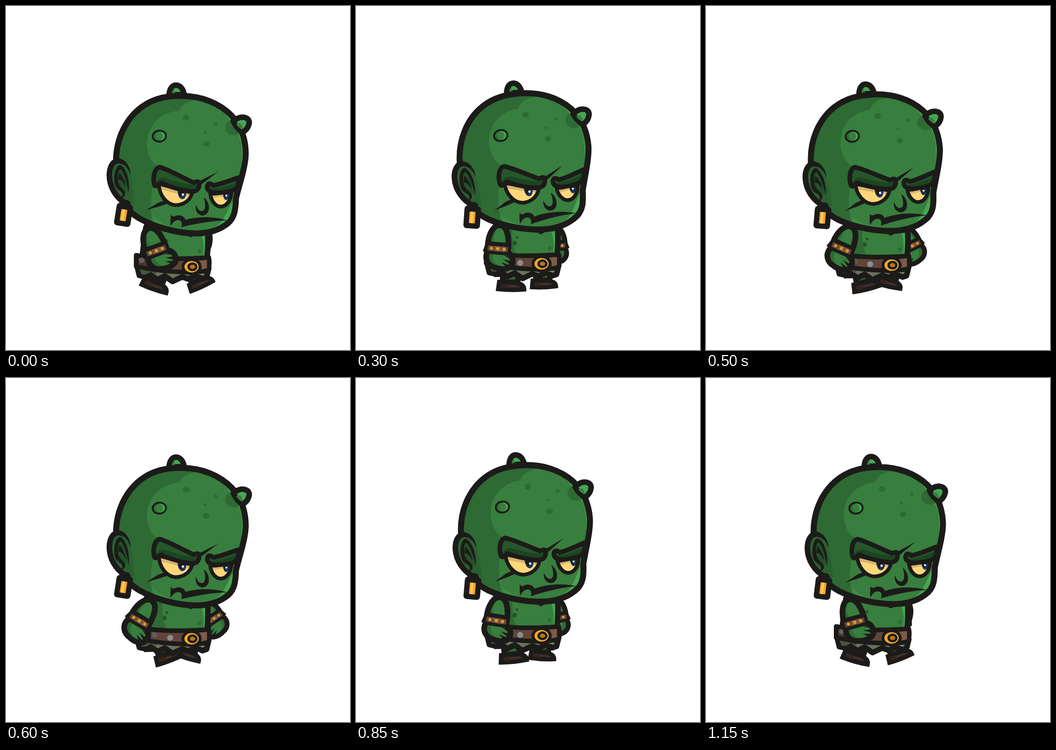
These frames come from a looping animation (748x748 px, 1.2 s). An HTML page:

```html
<!DOCTYPE html>
<html lang="en">
<head>
<meta charset="utf-8">
<title>Goblin walk</title>
<style>
  html, body { margin: 0; width: 100%; height: 100%; overflow: hidden; background: #fff; }
  svg { display: block; width: 100vw; height: 100vh; }
  .ink { fill: #1c1b19; }
  .line { stroke: #1c1b19; stroke-width: 12; stroke-linejoin: round; stroke-linecap: round; }
  .mid { stroke-width: 10; }
  .thin { stroke-width: 8; }
  .open { fill: none; }
  .sharp { stroke-linejoin: miter; }
  .skin { fill: #387e3e; }
  .shade { fill: #2e6a34; }
  .light { fill: #45a651; }
  .lid { fill: #25572b; }
  .deep { fill: #1b4520; }
  .eye { fill: #ffd77a; }
  .tan { fill: #d8b570; }
  .iris { fill: #18335f; }
  .gold { fill: #f6a626; }
  .belt { fill: #614539; }
  .shoe { fill: #41302a; }
</style>
</head>
<body>
<svg viewBox="0 0 748 748">
  <defs>
    <path id="skull" d="M239 338C239 287 262 241 300 216C325 200 350 195.500 380 195.500C425 195 465 212 490 238C512 262 521 290 521 322C520 352 507 388 500 418C499 446 496 459 484 471C465 487 440 494.500 412 494.500C370 494 325 481 290 462C270 450 255 435 245 410Z"/>
    <path id="eyeL" d="M332 387C350 390 375 400 405 406C401 421 388 433 368 433C348 431 333 411 332 387Z"/>
    <path id="eyeR" d="M444 408C460 409 475 405 490 399C491 416 483 436 466 436C453 435 445 420 444 408Z"/>
    <path id="torsoShape" d="M306 478H438C440 510 439 535 436 556H296C298 530 302 500 306 478Z"/>
    <path id="upper" d="M290 532C288 508 297 484 312 483C327 483 334 503 335 532Z"/>
    <path id="fore" d="M291 541C283 560 295 574 312 576C326 580 343 576 346 566C349 555 343 545 335 541Z"/>
    <clipPath id="inSkull"><use href="#skull"/></clipPath>
    <clipPath id="inL"><use href="#eyeL"/></clipPath>
    <clipPath id="inR"><use href="#eyeR"/></clipPath>
    <clipPath id="inTorso"><use href="#torsoShape"/></clipPath>
    <clipPath id="inArm"><use href="#upper"/><use href="#fore"/></clipPath>

    <g id="arm">
      <use href="#upper" class="skin line"/>
      <use href="#fore" class="skin line"/>
      <g clip-path="url(#inArm)">
        <path class="shade" d="M276 480H312C302 492 300 508 303 530V548C301 562 312 572 334 579H276Z"/>
      </g>
      <use href="#upper" class="line open"/>
      <use href="#fore" class="line open"/>
      <path class="ink" d="M286 520L280 542L291 547H341L340 520Z"/>
      <path class="belt" d="M290 529H334V540H290Z"/>
      <path fill="#7b583e" d="M304 529H327V540H304Z"/>
      <g class="gold" fill-opacity=".85">
        <circle cx="298" cy="534.500" r="3.500"/><circle cx="312" cy="534.500" r="3.500"/><circle cx="326" cy="534.500" r="3.500"/>
      </g>
      <path class="ink" d="M346 550L326 547L344 556ZM346 559L325 556L342 566ZM342 568L322 563L336 574Z"/>
    </g>

    <g id="leg">
      <path class="shade line" d="M320 572L319 602H352L353 572Z"/>
      <path class="shoe line mid sharp" d="M312 602L310 617C330 619 350 618.500 366 617C366 609 360 606 350 603Z"/>
      <path fill="#34261f" d="M316 606L315 613C321 615 327 615 332 615L331 606Z"/>
    </g>
  </defs>

  <g id="farArm"><use href="#arm" transform="translate(432 492) scale(-.85 .85) translate(-312.700 -491)"/></g>
  <g id="legB"><use href="#leg" transform="translate(407 565) scale(.93) translate(-338 -567)"/></g>
  <g id="legA"><use href="#leg"/></g>

  <g id="body">
    <use href="#torsoShape" class="skin line"/>
    <g clip-path="url(#inTorso)">
      <path class="shade" d="M290 478H343C337 500 340 528 352 556H290Z"/>
      <path class="light" d="M425 498C431 515 431 535 428 550H440V498Z"/>
      <ellipse class="shade" cx="421" cy="533" rx="4" ry="4.500"/>
      <g fill="#235429"><ellipse cx="345" cy="522" rx="4.500" ry="5"/><circle cx="350" cy="510" r="3"/></g>
    </g>
    <use href="#torsoShape" class="line open"/>
    <path class="line open" style="stroke-width:16" d="M306 482L298 545"/>
    <path class="ink" d="M378 490C388 504 394 496 399 502C406 504 408 498 424 490Z"/>

    <path class="line" fill="#69735a" d="M285 566L290 586L304 589L315 584L329 595L345 587L362 599L383 589L397 594L414 586L427 593L436 590L441 570Z"/>
    <path fill="#4b5441" d="M290 571L295 584L304 584L315 578L324 585L330 576Z"/>
    <path fill="#7d866a" d="M408 580L428 586L435 576Z"/>
    <path class="ink" d="M300 590L315 579L328 591L344 584L361 595L382 585L397 590L414 582L426 589L436 583V592L300 596Z"/>
    <path class="belt line mid" d="M283 542C320 549 370 552 441 547C443 556 442 566 440 575C400 583 330 577 283 566Z"/>
    <path fill="#49352d" d="M288 548L311 552V566L288 562Z"/>
    <path fill="#7d5a4b" d="M421 554L437 552V570L424 573Z"/>
    <circle cx="295" cy="553" r="6" fill="#626262"/>
    <circle cx="323" cy="559" r="6" fill="#5e5e5e"/>
    <circle cx="357" cy="565" r="6.500" fill="#8c8c8c"/>
    <ellipse class="ink" cx="403.500" cy="567" rx="22" ry="18.500"/>
    <ellipse class="gold" cx="403.500" cy="567" rx="15.500" ry="12.500"/>
    <path fill="#ffc35a" d="M413 558C419 564 419 570 413 576Z"/>
    <ellipse class="ink" cx="405.500" cy="567" rx="11" ry="9.500"/>
    <ellipse cx="405.500" cy="567" rx="6" ry="4.500" fill="#b5761c"/>
  </g>

  <g id="nearArm"><use href="#arm"/></g>

  <g id="head">
    <path class="light line" d="M354 193C355 180 361 172 369 172C378 172 385 180 387 193Z"/>
    <path class="skin" d="M360 190C361 184 363 181 366 179C365 184 365 187 368 190Z"/>
    <use href="#skull" class="skin"/>
    <g clip-path="url(#inSkull)">
      <path class="shade" d="M414 205C394 207 381 215 376 228C335 230 305 262 306 302C308 330 320 343 332 350L319 395C313 430 313 455 325 500H200V180H414Z"/>
      <path class="light" d="M446 206C478 232 504 266 511 296C515 325 511 348 506 378H530V200Z"/>
      <path class="light" d="M504 410C488 428 484 444 476 456C468 477 445 487 420 492L490 504L515 420Z"/>
      <path class="light" fill-opacity=".35" d="M318 455C335 474 365 486 400 491L330 498Z"/>
      <g class="shade">
        <ellipse cx="495" cy="264" rx="19" ry="17"/>
        <ellipse cx="391" cy="243" rx="7" ry="6"/>
        <ellipse cx="455.500" cy="257" rx="4" ry="3.500"/>
        <circle cx="432.500" cy="275" r="2.800"/>
        <ellipse cx="435" cy="299.500" rx="7" ry="6"/>
      </g>
    </g>
    <use href="#skull" class="line open" style="stroke-width:13"/>

    <path fill="#2a6030" d="M244 337C262 336 273 365 276 400L279 431L262 432C240 420 224 390 224 365C226 348 233 338 244 337Z"/>
    <path class="line open" d="M261 430C238 417 224 392 224.500 367C225 348 233 337 244 336.500"/>
    <path class="ink" d="M240 331C259 331 270 348 271 368C264 350 257 343 243 342Z"/>
    <path fill="#225129" d="M240 380C240 362 244 355 250 356C259 366 264 384 263 405C254 404 244 396 240 380Z"/>
    <path class="ink" d="M236 386C233 362 240 346 249 346C263 355 270 383 266 408C263 386 258 364 249 355C242 358 243 372 244 384C248 395 257 399 259 406C260 412 256 417 250 418C254 412 254 407 249 403C243 399 238 395 236 386Z"/>
    <path class="ink" d="M246 362C254 372 259 381 260 394C255 384 250 376 244 378Z"/>

    <circle class="ink" cx="262" cy="431" r="9"/>
    <path class="ink" d="M262 428L277 438L266 443Z"/>
    <g transform="rotate(9 255.500 454.500)">
      <rect class="ink" x="237.500" y="430" width="36" height="49" rx="7"/>
      <rect class="gold" x="249" y="442.500" width="13" height="25"/>
      <rect x="252" y="442.500" width="5" height="25" fill="#ffc866"/>
    </g>

    <path class="light line" d="M494 250C498 260 505 269 514 274C522 270 527 262 528.500 254C529 245 521 241 512 241.500C505 242 500 245 494 250Z"/>
    <path class="skin" d="M500 257C503 255 506 254 509 255C513 259 515 264 513 269C508 266 504 262 500 257Z"/>

    <g transform="rotate(-6 333 283)">
      <ellipse class="light" cx="333" cy="283" rx="15" ry="12"/>
      <ellipse class="shade" cx="328" cy="283" rx="10" ry="12"/>
      <ellipse class="skin" cx="333" cy="283" rx="8" ry="9"/>
      <ellipse class="line open" cx="333" cy="283" rx="14.500" ry="12" style="stroke-width:4"/>
    </g>

    <use href="#eyeL" class="eye"/>
    <g clip-path="url(#inL)">
      <path class="tan" d="M330 385L410 402V414C385 414 355 402 335 399Z"/>
      <path class="iris" d="M373 395C372 412 377 420 384 420C390 419 393 411 392 398Z"/>
      <path class="ink" d="M375 398C374 408 376 413 380 415C384 412 386 406 386 399Z"/>
      <circle cx="384.500" cy="410" r="2.600" fill="#fff"/>
    </g>
    <use href="#eyeL" class="line open thin"/>
    <use href="#eyeR" class="eye"/>
    <g clip-path="url(#inR)">
      <path class="tan" d="M440 405L492 396L487 414C472 412 460 416 446 419Z"/>
      <path class="iris" d="M472 400C470 413 474 422 479 422C485 420 487 410 487 398Z"/>
      <path class="ink" d="M474 402C473 410 475 415 477 416C481 413 483 407 483 401Z"/>
      <circle cx="479" cy="412" r="2.200" fill="#fff"/>
    </g>
    <use href="#eyeR" class="line open thin"/>

    <path class="lid line mid" d="M334 350.500C350 354 385 374 408 384C415 381 420 381 420 386C420 397 415 403 405 403C385 401 355 394 337 384C330 388 326 394 323 390C318 375 322 353 334 350.500Z"/>
    <path class="deep" d="M327 384C330 374 339 371 350 375C370 382 390 389 414 389C412 396 408 398 402 398C380 396 356 388 339 379C333 380 329 384 327 384Z"/>
    <path class="lid line mid" d="M438 390C440 384 446 386 450 390C470 387 490 378 505 373C507 382 503 394 496 400C482 404 460 408 446 404C438 401 436 395 438 390Z"/>
    <path class="deep" d="M443 397C462 396 483 392 501 383C500 389 497 393 493 396C480 400 460 403 448 400Z"/>

    <path class="ink" d="M305 444L330 428L346 422L350 430L336 435Z"/>
    <path class="ink" d="M461 360L424 379L414 384L418 392L430 384Z"/>
    <path class="ink" d="M413 432C408 454 432 464 440 446C444 433 437 421 430 416C434 430 435 445 426 446C419 446 416 440 413 432Z"/>
    <path class="ink" d="M359 453C362 461 366 457 373 455C384 455 389 460 390 465C410 459 445 455 482 466C450 466 415 473 388 479L381 481C385 470 380 464 371 466C364 468 361 474 358 478C357 472 358 462 359 453Z"/>
  </g>
</svg>
<script>
  const LOOP = 1200, STEP = 50;
  const part = id => document.getElementById(id);

  // Keys are [ms, value]; each track repeats after its period.
  const tracks = {
    bob: [600, [[0, 0], [50, 0], [150, -4.5], [200, -6], [300, -6.4], [400, -5.7], [500, -3.5], [550, -1.8]]],
    tilt: [600, [[0, .1], [50, .5], [100, -.5], [200, -2.95], [250, -4.05], [350, -6], [400, -6.45], [450, -5.9], [500, -4.1], [550, -1.9]]],
    nearArm: [1200, [[0, -20], [200, -2], [400, 12], [600, 31], [850, 9], [1000, -4], [1150, -15]]],
    farArm: [1200, [[0, 20], [200, 2], [400, -14], [600, -33], [850, -10], [1000, 3], [1150, 15]]],
    legA: [1200, [[0, 19], [200, 5], [400, -4], [600, -21], [850, -6], [1000, 5], [1150, 16]]],
    legB: [1200, [[0, -25], [200, -10], [400, 5], [600, 17], [850, 3], [1000, -8], [1150, -21]]]
  };

  // Smooth periodic curve through the keys.
  function sample([period, keys], time) {
    const t = time % period, n = keys.length;
    const key = i => {
      const wrap = Math.floor(i / n), [ms, v] = keys[i - wrap * n];
      return [ms + wrap * period, v];
    };
    let i = n - 1;
    while (keys[i][0] > t) i--;
    const [a, b, c, d] = [key(i - 1), key(i), key(i + 1), key(i + 2)];
    const span = c[0] - b[0], u = (t - b[0]) / span;
    const m0 = (c[1] - a[1]) / (c[0] - a[0]) * span;
    const m1 = (d[1] - b[1]) / (d[0] - b[0]) * span;
    const u2 = u * u, u3 = u2 * u;
    return (2 * u3 - 3 * u2 + 1) * b[1] + (u3 - 2 * u2 + u) * m0 +
           (3 * u2 - 2 * u3) * c[1] + (u3 - u2) * m1;
  }

  function pose(id, dy, angle = 0, x = 0, y = 0) {
    part(id).setAttribute("transform", `translate(0 ${dy}) rotate(${angle} ${x} ${y})`);
  }

  function draw() {
    const t = Math.floor(performance.now() % LOOP / STEP) * STEP;
    const at = name => sample(tracks[name], t);
    const bob = at("bob");
    pose("body", bob);
    pose("head", bob * .95, at("tilt"), 377, 492);
    pose("nearArm", bob, at("nearArm"), 312.7, 491);
    pose("farArm", bob, at("farArm"), 432, 492);
    pose("legA", bob * .2, at("legA"), 337, 567);
    pose("legB", bob * .2, at("legB"), 411, 567);
    requestAnimationFrame(draw);
  }
  draw();
</script>
</body>
</html>
```
